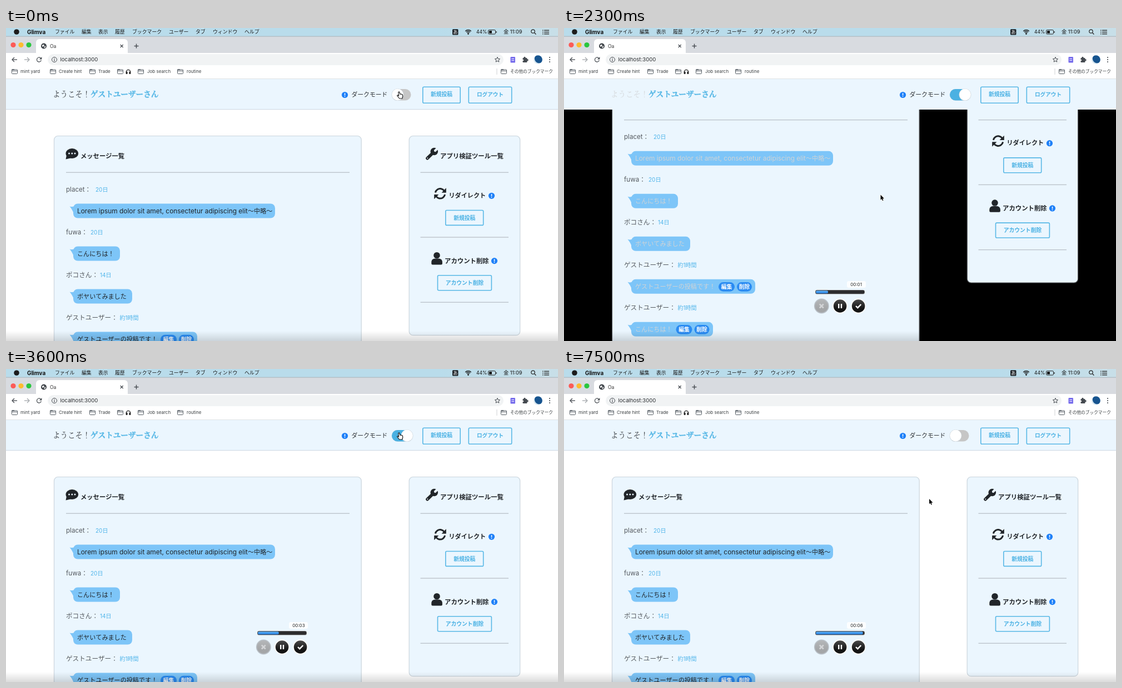
Recreate the animation shown at these times as an HTML page with a canvas. Size 993 by 564 pixels, loop 7.6 s.

```html
<!DOCTYPE html>
<html lang="ja">
<head>
<meta charset="utf-8">
<title>Dark mode demo</title>
<style>
html, body { margin: 0; width: 100%; height: 100%; overflow: hidden; background: #fff; }
canvas { display: block; width: 993px; height: 564px; }
</style>
</head>
<body>
<canvas id="stage"></canvas>
<script>
const W = 993, H = 564, LOOP = 7600, TOP = 92, MAX_SCROLL = 124;
const cv = document.getElementById('stage');
const dpr = window.devicePixelRatio || 1;
cv.width = W * dpr;
cv.height = H * dpr;
const c = cv.getContext('2d');

const SANS = 'Inter, "Noto Sans CJK JP", "Noto Sans CJK", sans-serif';
const SERIF = '"Noto Serif CJK JP", "Noto Sans CJK JP", "Noto Sans CJK", serif';
const PANEL = '#ebf6fe', SKY = '#58b8e6', INK = '#212529', BLUE = '#1e80f8';
const DARK_ON = 900, DARK_OFF = 3600;

// time, then values
const scrollKeys = [[1350, 0], [1750, 122], [1880, 129], [2000, 127.5], [2150, 124],
  [2600, 12], [2780, -5], [3000, -1.5], [3200, 0]];
const cursorKeys = [[0, 706, 115], [1000, 706, 115], [1330, 569.5, 300.5], [2650, 569.5, 300.5],
  [3000, 628, 203], [3350, 706, 115], [3750, 706, 115], [4200, 681.5, 144],
  [5500, 669.5, 198], [7500, 657, 234]];

const smooth = u => u * u * (3 - 2 * u);
const clamp = (v, a, b) => Math.min(b, Math.max(a, v));

function track(keys, t, i) {
  if (t <= keys[0][0]) return keys[0][i];
  for (let k = 1; k < keys.length; k++) {
    const a = keys[k - 1], b = keys[k];
    if (t <= b[0]) return a[i] + (b[i] - a[i]) * smooth((t - a[0]) / (b[0] - a[0]));
  }
  return keys[keys.length - 1][i];
}

// y is the middle of the glyphs; returns the right end
function text(s, x, y, size, color, weight = 400, family = SANS) {
  c.font = `${weight} ${size}px ${family}`;
  c.fillStyle = color;
  c.fillText(s, x, y + size * 0.37);
  return x + c.measureText(s).width;
}
function fade(x1, y1, x2, y2, from, to) {
  const g = c.createLinearGradient(x1, y1, x2, y2);
  g.addColorStop(0, from);
  g.addColorStop(1, to);
  return g;
}
function rect(x, y, w, h, color) {
  c.fillStyle = color;
  c.fillRect(x, y, w, h);
}
function box(x, y, w, h, r, fill, line, lw = 1) {
  c.beginPath();
  c.roundRect(x, y, w, h, r);
  if (fill) { c.fillStyle = fill; c.fill(); }
  if (line) { c.strokeStyle = line; c.lineWidth = lw; c.stroke(); }
}
function dot(x, y, r, color) {
  c.beginPath();
  c.arc(x, y, r, 0, 7);
  c.fillStyle = color;
  c.fill();
}
function ring(x, y, r, color, lw, a = 0, b = Math.PI * 2) {
  c.beginPath();
  c.arc(x, y, r, a, b);
  c.strokeStyle = color;
  c.lineWidth = lw;
  c.stroke();
}
function path(pts) {
  c.beginPath();
  pts.forEach(([x, y], i) => i ? c.lineTo(x, y) : c.moveTo(x, y));
}
function line(pts, color, lw) {
  path(pts);
  c.strokeStyle = color;
  c.lineWidth = lw;
  c.stroke();
}
function poly(pts, color) {
  path(pts);
  c.closePath();
  c.fillStyle = color;
  c.fill();
}
const hr = (x1, x2, y) => rect(x1, y - 0.9, x2 - x1, 1.3, '#b9c1c8');

function info(x, y) {
  dot(x, y, 5.6, BLUE);
  rect(x - 0.7, y - 3.2, 1.5, 4, '#fff');
  dot(x, y + 2.6, 0.9, '#fff');
}
function outlineButton(s, x, y, w, h, size = 9.8, shift = 0) {
  box(x + 0.8, y + 0.8, w - 1.6, h - 1.6, 2, null, SKY, 1.6);
  c.textAlign = 'center';
  text(s, x + w / 2, y + h / 2 + shift, size, '#49b1e4', 700);
  c.textAlign = 'left';
}
function pill(s, x, y, w) {
  box(x, y - 8.3, w, 16.6, 8.3, '#2a8bf2');
  c.textAlign = 'center';
  text(s, x + w / 2, y, 9.8, '#fff', 700);
  c.textAlign = 'left';
}

function menuBar() {
  rect(0, 0, W, 15, fade(780, 0, W, 0, '#b9dceb', '#c8dfe8'));
  dot(19, 7, 4.8, '#1c1c1c');
  text('Glimva', 38, 7, 9.9, '#111', 700);
  const items = [['ファイル', 88], ['編集', 136], ['表示', 166], ['履歴', 196], ['ブックマーク', 227],
    ['ユーザー', 293], ['タブ', 341], ['ウィンドウ', 372], ['ヘルプ', 429]];
  for (const [s, x] of items) text(s, x, 7, 8.9, '#1a1a1a');
  box(803, 2, 10.5, 10.5, 1.5, '#20262b');
  text('あ', 804.2, 7, 8, '#fff');
  for (const r of [2.5, 5, 7.5]) ring(831.5, 11, r, '#1a1a1a', 1.3, -2.35, -0.79);
  dot(831.5, 10.8, 1.2, '#1a1a1a');
  text('44%', 846, 7, 8.5, '#111');
  box(867.5, 3.5, 13, 7.5, 1.8, null, '#222');
  rect(869, 5, 5, 4.5, '#111');
  rect(881.5, 6, 1.3, 2.6, '#222');
  text('金 11:09', 895, 7, 9.2, '#111');
  ring(948, 6, 3.2, '#222', 1.2);
  line([[950.4, 8.4], [953.4, 11.5]], '#222', 1.3);
  for (const y of [3.5, 6.8, 10]) {
    rect(965, y, 1.6, 1.3, '#222');
    rect(968, y, 9, 1.3, '#222');
  }
}

function folder(x) {
  box(x + 0.5, 75, 10, 7.5, 1, null, '#555d64');
  line([[x + 0.5, 77.3], [x + 10.5, 77.3]], '#555d64', 1);
  rect(x + 0.5, 74, 4.5, 1.6, '#555d64');
}

function avatar() {
  dot(957, 57, 7.8, '#d5e6f0');
  c.save();
  c.beginPath();
  c.arc(957, 57, 7.8, 0, 7);
  c.clip();
  c.beginPath();
  c.ellipse(958.5, 55.5, 7.5, 8, -0.6, 0, 7);
  c.fillStyle = '#17548f';
  c.fill();
  c.restore();
}

function browser() {
  rect(0, 15, W, 30, '#d8dbe0');
  rect(0, 14.6, W, 1, '#a9b4ba');
  ['#fc5b57', '#fdbc2f', '#2bc63f'].forEach((k, i) => dot(13 + 14 * i, 30.5, 4.6, k));
  box(54, 20, 165, 26, [6, 6, 0, 0], '#fff');
  dot(68, 32.5, 5, '#3c4146');
  poly([[64.5, 31], [68, 29.5], [69, 31.5], [66, 34.5]], '#f4f4f4');
  poly([[69, 33], [71.5, 32], [70.5, 35.5], [68.5, 36]], '#f4f4f4');
  text('Oa', 79, 32.5, 8.6, '#333');
  const g = '#454a50';
  line([[205.7, 30], [210.7, 35]], g, 1.2);
  line([[210.7, 30], [205.7, 35]], g, 1.2);
  line([[230.5, 32.5], [238.5, 32.5]], g, 1.4);
  line([[234.5, 28.5], [234.5, 36.5]], g, 1.4);

  rect(0, 45, W, 47, '#fff');
  line([[20, 57], [11, 57]], g, 1.3);
  line([[15, 53], [11, 57], [15, 61]], g, 1.3);
  line([[33, 57], [42, 57]], '#a2a6aa', 1.3);
  line([[38, 53], [42, 57], [38, 61]], '#a2a6aa', 1.3);
  ring(59.5, 57, 4, g, 1.3, 0.3, 5.5);
  poly([[64.4, 52], [64.4, 56.4], [60, 56.4]], g);
  box(75, 47, 820, 20, 10, '#f1f3f4');
  ring(87, 57, 4.5, g, 1);
  rect(86.4, 56.3, 1.2, 3.4, g);
  rect(86.4, 54.2, 1.2, 1.2, g);
  text('localhost:3000', 97.5, 56.7, 9.6, '#2b2e31');

  const star = [];
  for (let i = 0; i < 10; i++) {
    const a = i * Math.PI / 5 - Math.PI / 2, r = i % 2 ? 2.2 : 4.8;
    star.push([884 + r * Math.cos(a), 57.2 + r * Math.sin(a)]);
  }
  path(star);
  c.closePath();
  c.strokeStyle = g;
  c.lineWidth = 1;
  c.stroke();
  box(907.5, 52, 8.5, 10.5, 1, '#766cec');
  rect(909.5, 55, 4.5, 1, '#fff');
  rect(909.5, 58, 4.5, 1, '#fff');
  box(929.5, 54, 8, 8, 1, g);
  dot(933, 53.5, 1.7, g);
  dot(938, 57.7, 1.7, g);
  dot(930, 58, 1.2, '#fff');
  avatar();
  for (const y of [53, 57, 61]) dot(978, y, 1.1, g);

  const marks = [[10, 'mint yard', 26], [79, 'Create hint', 95], [150, 'Trade', 166],
    [200, '', 0], [237, 'Job search', 254], [308, 'routine', 325]];
  for (const [x, s, tx] of marks) {
    folder(x);
    text(s, tx, 78.5, 8, '#3c4043');
  }
  ring(220, 79, 3.7, '#222', 1.3, Math.PI, 0);
  box(215.6, 78.5, 3, 4.5, 1, '#222');
  box(221.4, 78.5, 3, 4.5, 1, '#222');
  rect(882.5, 73, 1, 11, '#cfd2d6');
  folder(890);
  text('その他のブックマーク', 907, 78.5, 7.7, '#3c4043');
  rect(0, 91, W, 1, '#dfe2e5');
}

function header(dy, dark, on) {
  c.save();
  c.translate(0, dy);
  rect(0, TOP, W, 55, PANEL);
  if (!dark) rect(0, 146.2, W, 1, '#cbd8e2');
  text('ようこそ！', 84, 119.2, 13.5, dark ? '#d3d6d9' : '#2d3135', 400, SERIF);
  const user = 'ゲストユーザーさん';
  text(user, 152, 119.2, 13.6, SKY, 700, SERIF);
  // the serif face may lack a bold cut
  c.strokeStyle = SKY;
  c.lineWidth = 0.45;
  c.strokeText(user, 152, 119.2 + 13.6 * 0.37);
  info(609.5, 120.5);
  text('ダークモード', 621.5, 120.3, 10.8, '#2d3135');
  box(694, 110, 34.5, 20.5, 10.2, '#c6c6c6');
  c.globalAlpha = on;
  box(694, 110, 34.5, 20.5, 10.2, '#4bb1e2');
  c.globalAlpha = 1;
  const kx = 704.5 + 17 * on;
  dot(kx, 120.2, 10.9, '#c9d3da');
  dot(kx, 120, 10.4, '#fff');
  outlineButton('新規投稿', 749, 105.5, 69, 30.5, 9.8, -1.5);
  outlineButton('ログアウト', 831.5, 105.5, 79, 30.5, 9.6, -1.5);
  c.restore();
}

const messages = [
  ['placet', '20日', 161, 484, 'Lorem ipsum dolor sit amet, consectetur adipiscing elit', '〜中略〜'],
  ['fuwa', '20日', 152, 205, '', 'こんにちは！'],
  ['ポコさん', '14日', 169, 227, '', 'ボヤいてみました'],
  ['ゲストユーザー', '約1時間', 204.5, 344, '', 'ゲストユーザーの投稿です！', 278],
  ['ゲストユーザー', '約1時間', 204.5, 268, '', 'こんにちは！', 201.5]
];

function message([name, date, dx, right, latin, jp, edit], y, dark) {
  text(name + '：', 108, y, 11.6, '#555a5f');
  text(date, dx, y + 0.7, 10, '#4eb4ea');
  const m = y + 39;
  box(121, m - 13, right - 121, 26, 8, '#7dc5f8');
  c.beginPath();
  c.moveTo(114.5, m - 8);
  c.quadraticCurveTo(120, m - 6.5, 124, m - 9);
  c.lineTo(122, m + 5);
  c.quadraticCurveTo(119, m - 3, 114.5, m - 8);
  c.fill();
  const ink = dark ? '#cfd3d6' : INK;
  text(jp, text(latin, 128, m, 11.9, ink), m, 11.1, ink);
  if (edit) {
    pill('編集', edit, m + 0.5, 29);
    pill('削除', edit + 33, m + 0.5, 27);
  }
}

function commentIcon() {
  c.beginPath();
  c.ellipse(118.8, 226, 11.3, 9, 0, 0, 7);
  c.fillStyle = INK;
  c.fill();
  poly([[109, 229], [107.5, 236.5], [118, 234]], INK);
  for (const x of [113.5, 118.8, 124]) dot(x, 226, 1.5, PANEL);
}
function wrenchIcon() {
  c.lineCap = 'round';
  line([[758, 234.8], [768, 225]], INK, 5.6);
  dot(770.3, 222.5, 6.8, INK);
  line([[772, 221], [777.5, 215.5]], PANEL, 4.2);
  c.lineCap = 'butt';
  dot(758.3, 234.5, 1, PANEL);
}
function refreshIcon() {
  for (const a of [0, Math.PI]) {
    c.save();
    c.translate(781, 298.3);
    c.rotate(a);
    ring(0, 0, 8.8, INK, 3, Math.PI + 0.2, Math.PI * 2 - 0.6);
    poly([[10.8, -10], [10.8, -1.6], [2.6, -1.6]], INK);
    c.restore();
  }
}
function userIcon() {
  dot(775, 409.7, 5.8, INK);
  box(765.3, 415.6, 19.6, 10.9, [6, 6, 2, 2], INK);
}

function page(dy, dark) {
  c.save();
  c.translate(0, dy);
  const edge = dark ? '#4a4d50' : '#cbd5dd';
  box(86.5, 194.5, 552.7, 493, 7, PANEL, edge, 1.2);
  box(725.2, 194.5, 199.5, 359.2, 7, PANEL, edge, 1.2);
  commentIcon();
  text('メッセージ一覧', 134, 230.5, 11.3, INK, 700);
  hr(108, 618, 260.5);
  messages.forEach((m, i) => message(m, 290.5 + 77 * i, dark));

  wrenchIcon();
  text('アプリ検証ツール一覧', 781, 230.5, 11.4, INK, 700);
  hr(745.5, 904, 260.5);
  refreshIcon();
  text('リダイレクト', 796.5, 302, 11.1, INK, 700);
  info(873.5, 302.3);
  outlineButton('新規投稿', 790, 327.7, 69.5, 28.5);
  hr(745.5, 904, 377.3);
  userIcon();
  text('アカウント削除', 789, 419.6, 11.4, INK, 700);
  info(878.5, 419.6);
  outlineButton('アカウント削除', 775.7, 445, 98.5, 28.5);
  hr(745.5, 904, 494.5);
  c.restore();
}

function recorder(t) {
  const sec = Math.max(0, Math.floor((t - 550) / 1000));
  box(509, 456, 34, 12, 3, 'rgba(255,255,255,.85)');
  text('00:0' + sec, 515.2, 462.3, 8, '#222');
  box(452, 472, 89, 7.4, 3, '#2c2c2e', 'rgba(255,255,255,.6)', 0.8);
  const w = 88 * clamp((t - 380) / 7300, 0, 1);
  if (w > 1) box(453, 473.2, w - 1, 5, 2.2, fade(0, 473, 0, 479, '#62b4f8', '#1d77dc'));
  [463.3, 496.6, 529.6].forEach((x, i) => {
    dot(x, 501, 13.4, i ? 'rgba(255,255,255,.95)' : 'rgba(150,155,160,.6)');
    dot(x, 501, 11.8, i ? fade(0, 489, 0, 506, '#4a4a4a', '#141414') : fade(0, 489, 0, 506, '#b4b6b8', '#a4a6a8'));
  });
  line([[459.8, 497.5], [466.8, 504.5]], '#d2d4d6', 2.6);
  line([[466.8, 497.5], [459.8, 504.5]], '#d2d4d6', 2.6);
  rect(493, 497, 2.4, 8, '#fff');
  rect(497.8, 497, 2.4, 8, '#fff');
  line([[525, 501], [528.3, 504.2], [534.3, 498]], '#fff', 2.4);
}

function cursor(x, y) {
  const hand = x > 694 && x < 732 && y > 108 && y < 130;
  c.save();
  c.translate(x, y);
  c.lineJoin = 'round';
  if (hand) {
    path([[-0.2, 0.6], [1.2, 0], [2.2, 1], [2.8, 4.2], [4.6, 4], [6, 4.6], [7.4, 5.2], [7.8, 8],
      [6.8, 12], [1.6, 12], [-0.8, 9], [-2.4, 6.6], [-1.2, 5.8], [0.6, 7.4]]);
    c.closePath();
    c.fillStyle = '#fff';
    c.strokeStyle = '#111';
    c.lineWidth = 1.1;
    c.fill();
    c.stroke();
  } else {
    path([[0, 0], [0, 9.3], [2, 7.5], [3.5, 10.8], [5, 10.1], [3.6, 6.9], [6.4, 6.7]]);
    c.closePath();
    c.strokeStyle = '#fff';
    c.lineWidth = 1.4;
    c.stroke();
    c.fillStyle = '#0a0a0a';
    c.fill();
  }
  c.restore();
}

function draw(t) {
  c.setTransform(dpr, 0, 0, dpr, 0, 0);
  const dark = t >= DARK_ON && t < DARK_OFF;
  const on = smooth(clamp((t - DARK_ON) / 300, 0, 1)) - smooth(clamp((t - DARK_OFF) / 300, 0, 1));
  const scroll = track(scrollKeys, t, 1);
  const pos = clamp(scroll, 0, MAX_SCROLL), over = scroll - pos;

  rect(0, 0, W, H, dark ? '#000' : '#fff');
  c.save();
  c.beginPath();
  c.rect(0, TOP, W, H - TOP);
  c.clip();
  page(-scroll, dark);
  if (over > 0) rect(0, H - over, W, over, '#fff');
  if (over < 0) rect(0, TOP, W, -over, '#fff');
  header(-over, dark, on);
  const show = clamp((t - 1350) / 100, 0, 1) * clamp((3600 - t) / 250, 0, 1);
  if (show > 0) box(987, 93.5 + pos * 0.75, 5, 370, 2.5, `rgba(0,0,0,${0.55 * show})`);
  // soft shade along the lower screen edge
  rect(0, 546, W, 18, fade(0, 546, 0, H, 'rgba(0,0,0,0)', 'rgba(0,0,0,.14)'));
  c.restore();

  menuBar();
  browser();
  if (t >= 100) recorder(t);
  cursor(track(cursorKeys, t, 1), track(cursorKeys, t, 2));
}

const start = performance.now();
function tick() {
  draw((performance.now() - start) % LOOP);
  requestAnimationFrame(tick);
}
tick();
</script>
</body>
</html>
```
